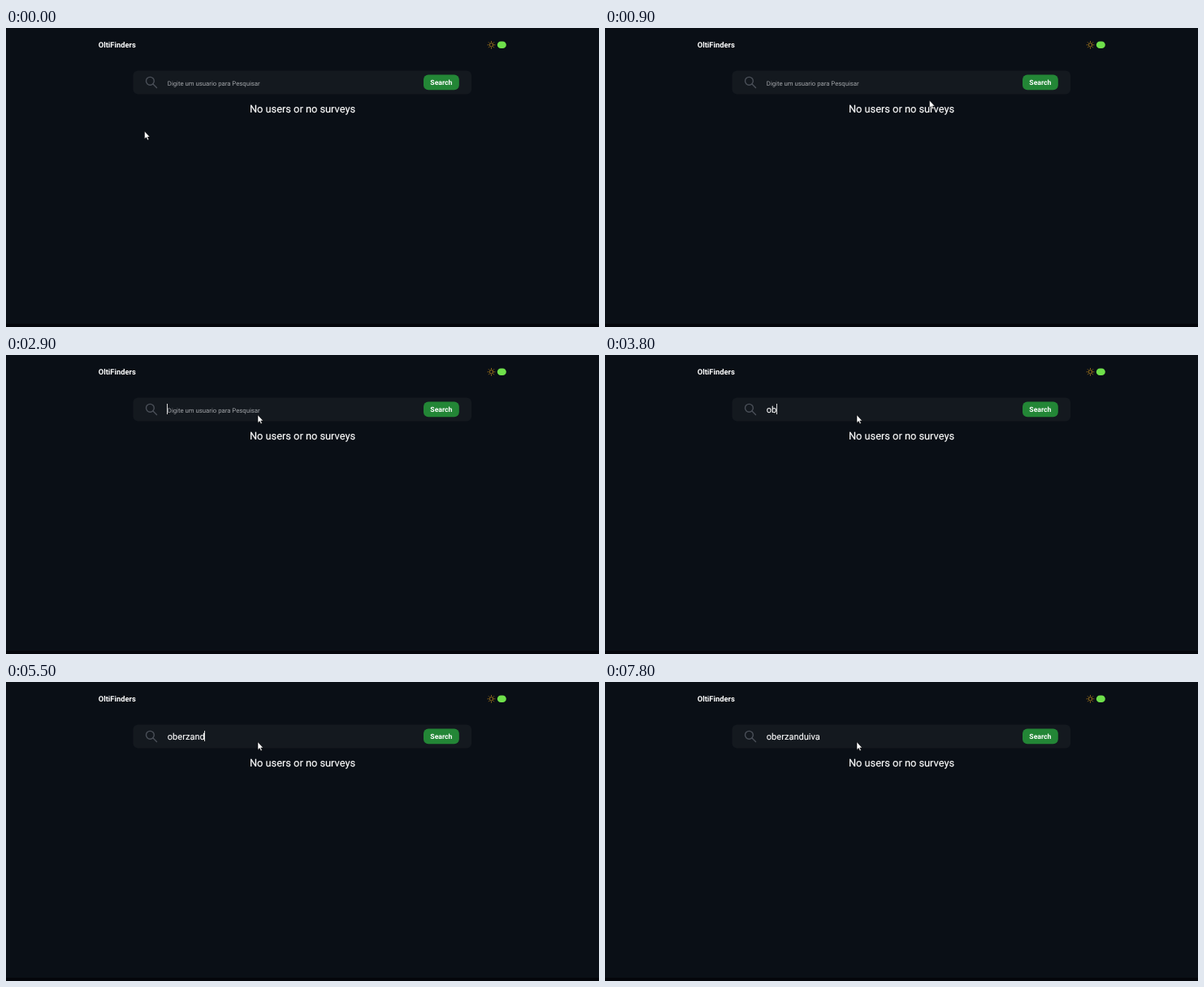
Animation, 730 px wide and 368 px high, one loop 8000 ms. Source, as an HTML page:

```html
<!DOCTYPE html>
<html lang="en">
<head>
<meta charset="utf-8">
<title>Profile search</title>
<style>
  html, body { margin: 0; width: 100%; height: 100%; overflow: hidden; background: #0a0f16; }
  svg { display: block; width: 730px; height: 368px; }
  text { font-family: Roboto, Arial, sans-serif; fill: #fff; text-rendering: geometricPrecision; }
  .title { font-size: 9.4px; font-weight: 700; }
  .button { font-size: 8.6px; font-weight: 700; text-anchor: middle; }
  .heading { font-size: 12.8px; text-anchor: middle; stroke: #fff; stroke-width: .15px; }
  .hint { font-size: 7.75px; fill: #a3a6aa; }
  .value { font-size: 11.05px; stroke: #fff; stroke-width: .1px; }
  .line { fill: none; stroke-linecap: round; }
</style>
</head>
<body>
<svg viewBox="0 0 730 368">
  <rect width="730" height="368" fill="#0a0f16"/>
  <rect y="364" width="730" height="4" fill="#04060b"/>

  <text class="title" x="113.7" y="24">OltiFinders</text>
  <g class="line" stroke="#a87a1c" stroke-width=".9">
    <circle cx="597.5" cy="20.8" r="2.2"/>
    <path id="rays"/>
  </g>
  <rect x="604.8" y="16.5" width="11" height="8.6" rx="4.3" fill="#6fe04b"/>

  <rect x="156.5" y="52.5" width="416.5" height="29" rx="6" fill="#14191f"/>
  <g class="line" stroke="#4b5059" stroke-width="1.4">
    <circle cx="177.4" cy="65.3" r="4.9"/>
    <path d="M181 69 L185.5 73.4"/>
  </g>
  <text class="hint" id="hint" x="198.8" y="71">Digite um usuario para Pesquisar</text>
  <text class="value" id="value" x="198.8" y="71.1"></text>
  <rect id="caret" y="60" width="1" height="13" fill="#d8d8d8"/>

  <rect x="514" y="57.6" width="43.8" height="18.6" rx="6" fill="#238636"/>
  <text class="button" x="535.8" y="69.6">Search</text>
  <text class="heading" x="365" y="103.8">No users or no surveys</text>

  <path id="pointer" d="M0 0 V9.6 L2.2 7.6 L3.8 11 L5.3 10.3 L3.8 7.1 H6.6 Z"
        fill="#fff" stroke="#000" stroke-width=".5"/>
</svg>
<script>
const LOOP = 8000, FRAME = 100, BLINK = 550;
const FOCUS = 1800, FIRST_KEY = 3600, ERASE = 7100, LAST_KEY = 7200;
const TEXT_X = 198.8, NAME = 'oberzanduiva';
const $ = id => document.getElementById(id);
const hint = $('hint'), value = $('value'), caret = $('caret'), pointer = $('pointer');

const clamp = v => Math.min(1, Math.max(0, v));
const progress = (t, from, to) => clamp((t - from) / (to - from));
const mix = (a, b, k) => a + (b - a) * k;
const mixPoint = (p, q, k) => p.map((v, i) => mix(v, q[i], k));

// One sweeping arc, then three short straight glides.
function pointerAt(t) {
  const start = [170.5, 127], bend = [225, 207], heading = [399.4, 89];
  const field = [388.6, 64.5], pause = [375, 66], rest = [310, 73.8];
  const k = progress(t, 0, 900);
  let p = mixPoint(mixPoint(start, bend, k), mixPoint(bend, heading, k), k);
  p = mixPoint(p, field, progress(t, 900, 1100));
  p = mixPoint(p, pause, progress(t, 1300, 1600));
  return mixPoint(p, rest, progress(t, 1900, 2100));
}

// Letters typed: an even pace within each burst, one backspace near the end.
function typedAt(t) {
  if (t < FIRST_KEY) return '';
  if (t >= ERASE && t < LAST_KEY) return NAME.slice(0, -1);
  const count = 1 + 4 * progress(t, FIRST_KEY, 4300) + 2 * progress(t, 4300, 5000)
    + progress(t, 5000, 5500) + progress(t, 5500, 5600) + 3 * progress(t, 5600, 6600);
  return NAME.slice(0, Math.floor(count + 1e-6));
}

// The blink restarts on focus and on the last key; it stays solid while typing.
function caretOn(t) {
  if (t < FOCUS) return false;
  if (t >= FIRST_KEY && t < LAST_KEY) return true;
  const since = t - (t < FIRST_KEY ? FOCUS : LAST_KEY);
  return Math.floor(since / BLINK) % 2 === 0;
}

function drawRays() {
  let d = '';
  for (let i = 0; i < 8; i++) {
    const c = Math.cos(i * Math.PI / 4), s = Math.sin(i * Math.PI / 4);
    d += `M${597.5 + 3.6 * c} ${20.8 + 3.6 * s}L${597.5 + 4.4 * c} ${20.8 + 4.4 * s}`;
  }
  $('rays').setAttribute('d', d);
}

function draw(t) {
  pointer.setAttribute('transform', `translate(${pointerAt(t)})`);

  const text = typedAt(t);
  if (value.textContent !== text) value.textContent = text;
  hint.style.display = text ? 'none' : '';

  const width = text ? value.getComputedTextLength() : 0;
  caret.setAttribute('x', Math.floor(TEXT_X + width));
  caret.style.display = caretOn(t) ? '' : 'none';
}

const start = performance.now();
function tick() {
  const t = (performance.now() - start) % LOOP;
  draw(Math.floor(t / FRAME) * FRAME);
  requestAnimationFrame(tick);
}

drawRays();
tick();
</script>
</body>
</html>
```
